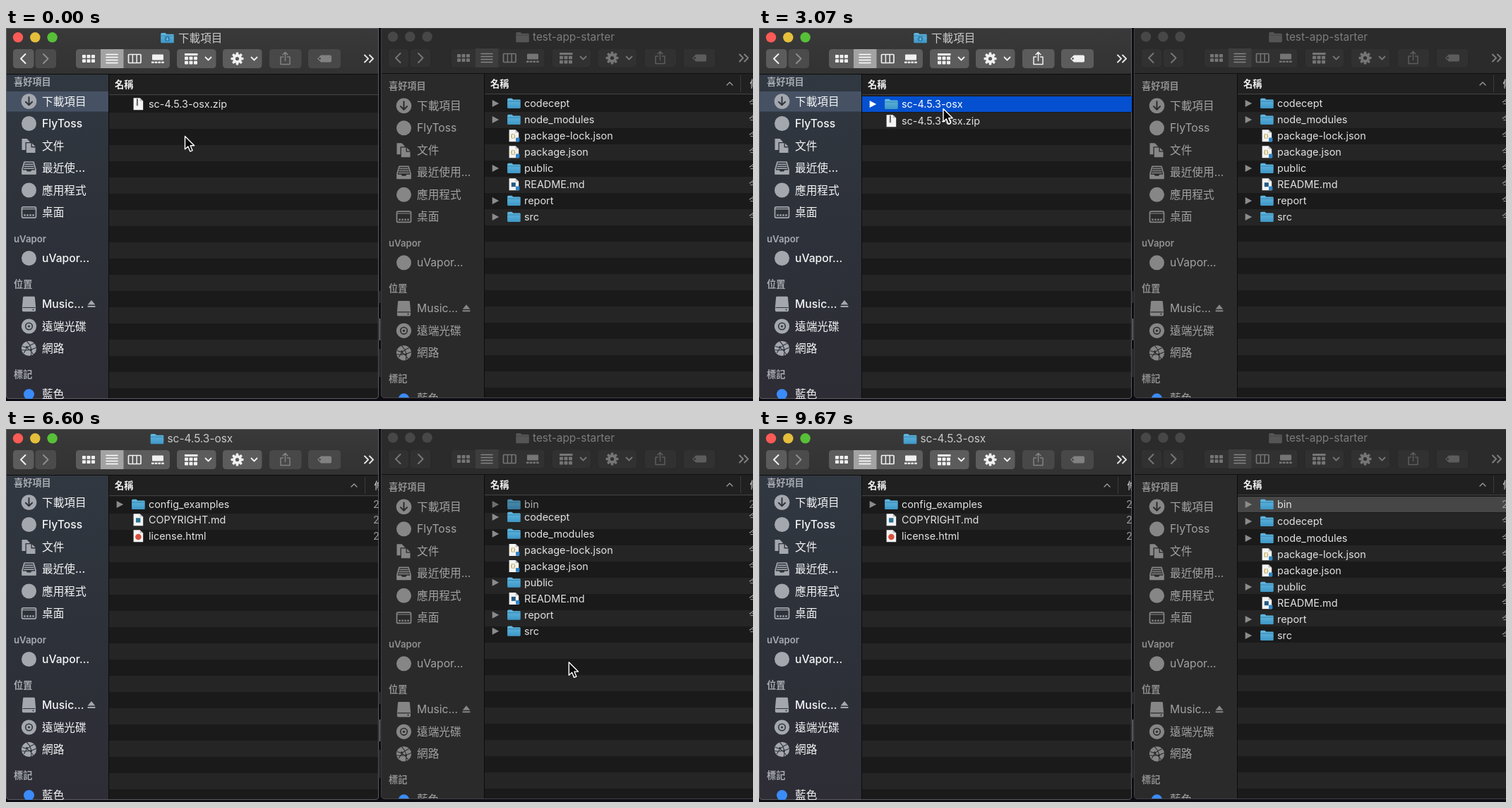
Recreate the animation shown at these times as an HTML page. Size 1058 px wide and 529 px high, loop 9740 ms.

```html
<!DOCTYPE html>
<html lang="zh-Hant">
<head>
<meta charset="utf-8">
<style>
html, body { margin: 0; width: 100%; height: 100%; overflow: hidden; background: #0c0c12; }
svg { display: block; width: 100vw; height: 100vh; }
text { font-family: Inter, "Noto Sans CJK TC", "Noto Sans CJK", sans-serif; white-space: pre; }
</style>
</head>
<body>
<svg id="stage" viewBox="0 0 1058 529" preserveAspectRatio="none">
  <defs>
    <linearGradient id="barActive" x2="0" y2="1"><stop stop-color="#393939"/><stop offset="1" stop-color="#323232"/></linearGradient>
    <linearGradient id="sideActive" x2="0" y2="1"><stop stop-color="#313841"/><stop offset=".5" stop-color="#2d3139"/><stop offset="1" stop-color="#2e2d36"/></linearGradient>
    <linearGradient id="folderBlue" x2="0" y2="1"><stop stop-color="#62b9e2"/><stop offset="1" stop-color="#3f97c6"/></linearGradient>
    <clipPath id="leftClip"><path d="M0 0H528V521Q528 526 523 526H5Q0 526 0 521Z"/></clipPath>
    <clipPath id="rightClip"><path d="M532 0H1058V525H537Q532 525 532 520Z"/></clipPath>
    <clipPath id="leftList"><rect x="146" y="96" width="382" height="429"/></clipPath>
    <clipPath id="rightList"><rect x="678" y="95" width="380" height="429"/></clipPath>
  </defs>
  <g id="base"></g>
  <g id="live"></g>
  <g id="ghost"></g>
  <path id="cursor" d="M0 0V18.4L4.3 14.5L7.3 21.6L10.6 20.2L7.6 13.3H13.2Z" fill="#080808" stroke="#fff" stroke-width="1.4" stroke-linejoin="round"/>
</svg>
<script>
const LOOP = 9740, BLUE = '#0450d0';
const $ = id => document.getElementById(id);
const clamp = v => Math.max(0, Math.min(1, v));
const ease = v => (v = clamp(v)) * v * (3 - 2 * v);
const ramp = (t, a, b) => ease((t - a) / (b - a));
const mix = (a, b, k) => a + (b - a) * k;

const rect = (x, y, w, h, fill, r = 0, extra = '') =>
  `<rect x="${x}" y="${y}" width="${w}" height="${h}" rx="${r}" fill="${fill}" ${extra}/>`;
const circle = (x, y, r, fill, extra = '') => `<circle cx="${x}" cy="${y}" r="${r}" fill="${fill}" ${extra}/>`;
const line = (d, color, w = 1.6) =>
  `<path d="${d}" fill="none" stroke="${color}" stroke-width="${w}" stroke-linecap="round" stroke-linejoin="round"/>`;
const shape = (d, fill) => `<path d="${d}" fill="${fill}"/>`;
const at = (x, y, body) => `<g transform="translate(${x} ${y})">${body}</g>`;
const text = (s, x, y, size, fill, weight = 400) =>
  `<text x="${x}" y="${y + size * .355}" font-size="${size}" font-weight="${weight}" fill="${fill}">${s}</text>`;

// Icons are centred on their own origin.
const folder = (fill = 'url(#folderBlue)', edge = '#347fa8') =>
  shape('M-9.3-5.2Q-9.3-7-7.6-7H-3L-1-5.2H8Q9.3-5.2 9.3-4V6Q9.3 7.2 8 7.2H-8Q-9.3 7.2-9.3 6Z', fill) +
  line('M-9-2.8H9', edge, .9);
const page = shape('M-6.8-8.5H2.2L6.8-4.2V8.5H-6.8Z', '#f4f4f4') + shape('M2.2-8.5V-4.2H6.8Z', '#bdbdbd');
const badge = rect(2.6, 2.6, 5.4, 5.8, '#2f86c9', 1);
const fileIcons = {
  dir: folder(),
  zip: page + line('M-1.5-7V0', '#555', 1.8) + rect(-2.7, -1.5, 2.4, 4, '#777'),
  json: page + `<text x="-4.9" y="3" font-size="8" font-weight="600" fill="#b59a2c">{}</text>` + badge,
  md: page + rect(-3.4, -2.6, 6.4, 6.4, '#2b7397'),
  mdBadge: page + rect(-3.6, -2.6, 6, 6, '#245a83') + badge,
  html: page + circle(0, 1.2, 4.3, '#d9503f')
};

const sideIcons = {
  down: (c, bg) => circle(0, 0, 10.8, c) + line('M0-6V5M-4.6 .8L0 5.4L4.6 .8', bg, 2),
  disk: c => circle(0, 0, 10.5, c),
  docs: (c, bg) => shape('M-10-10H-3L1-6V6H-10Z', c) + shape('M-5-5H4L10 1V11H-5Z', bg) +
    shape('M-3.7-3.7H3V2.5H9V10H-3.7Z', c) + shape('M4.4-3.5L9 1.1H4.4Z', c),
  tray: c => line('M-6.5-8.5H6.5L9.5 2V8.5H-9.5V2Z', c, 1.7) + line('M-5.5-5.3H5.5M-6.3-2.3H6.3M-7 .7H7', c, 1.5) +
    shape('M-9.5 3H-4L-2.5 5H2.5L4 3H9.5V9H-9.5Z', c),
  desk: c => rect(-10, -7.6, 20, 15.2, 'none', 2, `stroke="${c}" stroke-width="1.7"`) +
    line('M-9-4.8H9', c, 1.2) + [-6, -2, 2, 6].map(x => rect(x - 1.2, 2.8, 2.4, 2.4, c)).join(''),
  drive: (c, bg) => shape('M-7-10.8H7Q8.2-10.8 8.4-9.6L9.6 4V9Q9.6 10.8 7.8 10.8H-7.8Q-9.6 10.8-9.6 9V4L-8.4-9.6Q-8.2-10.8-7-10.8Z', c) +
    line('M-8.6 5H8.6', bg, 1.2) + circle(6, 8, 1, bg),
  disc: (c, bg) => circle(0, 0, 10.6, c) + circle(0, 0, 4.8, 'none', `stroke="${bg}" stroke-width="1.6"`) + circle(0, 0, 1.6, bg),
  globe: (c, bg) => circle(0, 0, 10.6, c) +
    line('M-9-3Q0-1 6 8M-7 6Q-2-4 7-7M-3-10Q5-3 3 10M-10 2Q0 4 10-1', bg, 1.1) +
    circle(-3, -2, 1.5, bg) + circle(3, 2, 1.5, bg),
  tag: () => circle(0, 0, 7.5, '#3b8cf8')
};
const sideRows = [
  ['head', '喜好項目', 76], ['down', '下載項目', 104], ['disk', 'FlyToss', 135.5], ['docs', '文件', 167],
  ['tray', '最近使', 198.5], ['disk', '應用程式', 230], ['desk', '桌面', 261.5], ['head', 'uVapor', 299.5],
  ['disk', 'uVapor...', 326.5], ['head', '位置', 363.5], ['drive', 'Music...', 391.5], ['disc', '遠端光碟', 423],
  ['globe', '網路', 454.5], ['head', '標記', 491.5], ['tag', '藍色', 519.5]
];

function sidebar(dx, dy, active) {
  const ink = active ? '#f4f5f6' : '#a2a2a2', icon = active ? '#a4a8ae' : '#868686', bg = active ? '#2e343e' : '#2b2b2b';
  return sideRows.map(([kind, label, y]) => {
    if (kind === 'head') return text(label, 11 + dx, y + dy, 13.2, active ? '#a6aab1' : '#8f8f8f', 600);
    if (kind === 'tray') label += active ? '...' : '用...';
    return at(32.5 + dx, y + dy, sideIcons[kind](icon, bg)) + text(label, 51 + dx, y + dy, 15.7, ink, active ? 500 : 400) +
      (kind === 'drive' ? at(121 + dx, y + dy - .5, shape('M0-5L5.4 1.5H-5.4ZM-5.4 3H5.4V5H-5.4Z', icon)) : '');
  }).join('');
}

const chevron = (x, y, c) => line(`M${x - 4} ${y - 2}L${x} ${y + 2}L${x + 4} ${y - 2}`, c, 1.8);
const grid = (x, y, c) => [0, 1].map(j => [0, 1, 2].map(i => rect(x - 9 + i * 6.5, y - 5.5 + j * 6.3, 5, 4.8, c, .8)).join('')).join('');
const share = c => line('M-3-2.5H-6.5V8H6.5V-2.5H3M0 3V-9M-3.4-5.8L0-9.2L3.4-5.8', c, 1.5);
const label = c => shape('M-10 0L-5-5H8Q10-5 10-3V3Q10 5 8 5H-5Z', c);
function gear(c, bg) {
  let teeth = '';
  for (let i = 0; i < 8; i++) teeth += `<rect x="-1.8" y="-9" width="3.6" height="5" rx="1" transform="rotate(${i * 45})" fill="${c}"/>`;
  return teeth + circle(0, 0, 6.5, c) + circle(0, 0, 2.6, bg);
}

function toolbar(active) {
  const box = active ? '#5c5c5d' : '#313131', ink = active ? '#f0f0f0' : '#757575', dim = active ? '#8c8c8c' : '#757575';
  const edge = active ? '' : 'stroke="#292929"', y = 43.5;
  const button = (x, w, fill = box) => rect(x, 30, w, 27, fill, 4.5, edge);
  const lights = active ? ['#fc5b57', '#e5bf3c', '#57c038'] : Array(3).fill('#474747');
  return lights.map((c, i) => circle(17 + i * 24.3, 13.3, 7.2, c)).join('') +
    button(10, 29.5) + line('M27.5 37L21 43.5L27.5 50', active ? ink : dim, 2) +
    button(41.5, 29.5, active ? '#4b4b4c' : box) + line('M53 37L59.5 43.5L53 50', dim, 2) +
    button(99, 133) + rect(134, 30, 32.5, 27, active ? '#a3a3a4' : '#3d3d3d') + grid(117, y, ink) +
    line('M142 37.5H158M142 41.5H158M142 45.5H158M142 49.5H158', active ? '#fff' : '#858585', 1.5) +
    rect(173.5, 37.5, 17.5, 12, 'none', 1, `stroke="${ink}" stroke-width="1.7"`) + line('M179.4 38V49M185.2 38V49', ink, 1.5) +
    rect(207, 37.5, 16, 8, ink, 1) + [0, 1, 2, 3].map(i => rect(206 + i * 4.7, 47.5, 3.6, 2.5, ink)).join('') +
    button(242, 55.5) + rect(253, 36, 18.5, 3, ink) + grid(262, 46, ink) + chevron(286.5, y, ink) +
    button(307, 55.5) + at(327.5, y, gear(ink, box)) + chevron(351.5, y, ink) +
    (active ? '' : actions(false, false)) +
    line('M508 38.5L513 43.5L508 48.5M515 38.5L520 43.5L515 48.5', active ? '#e6e6e6' : '#808080', 1.9);
}
function actions(enabled, active = true) {
  const box = active ? (enabled ? '#5c5c5d' : '#484849') : '#313131', edge = active ? '' : 'stroke="#292929"';
  const ink = active ? (enabled ? '#f0f0f0' : '#818181') : '#5c5c5c';
  return rect(373, 30, 45.5, 27, box, 4.5, edge) + at(395.5, 43.5, share(ink)) +
    rect(428, 30, 46, 27, box, 4.5, edge) + at(451, 43.5, label(ink)) + circle(444.5, 43.5, 1.4, box);
}

function stripes(x, y, w) {
  let s = '';
  for (let i = 0; i < 19; i++) s += rect(x, y + i * 23, w, 23, i % 2 ? '#252525' : '#1a1a1a');
  return s;
}
const columns = (x, y) => line(`M${x - 19} ${y + 2}l4-4l4 4`, '#a0a0a0', 1.2) + rect(x, y - 12, 1, 24, '#3c3c3c') +
  text('修改日期', x + 13.5, y, 13.2, '#dadada', 500);

function row(x, { name, kind, y, pick, date, alpha = 1 }) {
  const isDir = kind === 'dir', blue = pick === BLUE;
  return `<g opacity="${alpha}">` + (pick ? rect(x - 1, y - 11, 383, 22, pick) : '') +
    (isDir ? at(x + 14, y, shape('M-4.3-5L5.2 0L-4.3 5Z', blue ? '#fff' : '#8b8b8b')) : '') +
    at(x + 40.4, y - .2, fileIcons[kind]) + text(name, x + 55, y, 14.4, blue ? '#fff' : '#e2e2e2') +
    (date ? text(date, x + 373, y, 14.4, blue ? '#d7e3ff' : '#989898') : '') + '</g>';
}

function drawBase() {
  const left = rect(0, 0, 528, 526, '#1a1a1a') + rect(0, 0, 528, 66, 'url(#barActive)') + toolbar(true) +
    rect(0, 66, 146, 460, 'url(#sideActive)') + rect(145, 66, 1, 460, '#0b0c0e') +
    rect(146, 66, 382, 30, '#202020') + rect(0, 65, 528, 1, '#0b0b0b') + rect(146, 94, 382, 1, '#414141') +
    text('名稱', 154, 80, 13.2, '#f0f0f0', 600) + `<g clip-path="url(#leftList)">${stripes(146, 97, 382)}</g>`;
  const right = rect(532, 0, 526, 525, '#1a1a1a') + rect(532, 0, 526, 65, '#2b2b2b') +
    at(531, -1, toolbar(false)) + at(731.5, 13, folder('#555', '#454545')) + text('test-app-starter', 746, 13, 15.4, '#7c7c7c') +
    rect(532, 65, 146, 460, '#2a2a2a') + sidebar(531, 6.3, false) + rect(677, 65, 1, 460, '#0c0c0c') +
    rect(678, 65, 380, 30, '#202020') + rect(532, 64, 526, 1, '#101010') + rect(678, 93, 380, 1, '#414141') +
    text('名稱', 686, 79, 13.2, '#f0f0f0', 600) + columns(1040, 79) +
    `<g clip-path="url(#rightList)">${stripes(678, 96, 380)}</g>`;
  $('base').innerHTML = rect(0, 0, 1058, 529, '#0c0c12') +
    rect(529, 373, 1, 17, '#4c4c52') + rect(529, 412, 1, 31, '#9b9ba4') + rect(529, 455, 1, 40, '#4c4c52') +
    `<g clip-path="url(#leftClip)">${left}</g><g clip-path="url(#rightClip)">${right}</g>` +
    '<path d="M.5 521V.5H527.5V521Q527.5 525.5 523 525.5H5Q.5 525.5 .5 521Z" fill="none" stroke="#626268" stroke-width=".9"/>' +
    '<path d="M1058 524.5H537Q531.5 524.5 531.5 520V.5H1058" fill="none" stroke="#47474b" stroke-width=".9"/>';
}

const PICK = 1700, UNZIP = 2800, OPEN = 3620, GRAB = 4650, DROP = 6060, MARK = 6980;

function leftFiles(t) {
  if (t < OPEN) {
    const zip = { name: 'sc-4.5.3-osx.zip', kind: 'zip', y: mix(108, 132, ramp(t, UNZIP, UNZIP + 230)) };
    if (t < UNZIP) return [{ ...zip, pick: t >= PICK && BLUE }];
    return [{ name: 'sc-4.5.3-osx', kind: 'dir', y: 108, pick: BLUE }, zip];
  }
  const up = ramp(t, 6350, 6600), rest = [['config_examples', 'dir', 107], ['COPYRIGHT.md', 'md', 129], ['license.html', 'html', 152]];
  const list = rest.map(([name, kind, y], i) => ({ name, kind, y: mix(131 + i * 23, y, up), date: '2' }));
  if (up < 1) list.unshift({ name: 'bin', kind: 'dir', y: 108, date: '2', alpha: 1 - up, pick: t >= GRAB && BLUE });
  return list;
}

const project = [['codecept', 'dir'], ['node_modules', 'dir'], ['package-lock.json', 'json'], ['package.json', 'json'],
  ['public', 'dir'], ['README.md', 'mdBadge'], ['report', 'dir'], ['src', 'dir']];
function rightFiles(t, over) {
  const down = ramp(t, 6400, 6700);
  const list = project.map(([name, kind], i) => ({
    name, kind, date: '今', y: 107 + i * 23 + down * (i ? 25 : 24), pick: over && name === 'src' && BLUE
  }));
  if (down) list.unshift({ name: 'bin', kind: 'dir', y: 107, date: '2', alpha: down, pick: t >= MARK && '#464646' });
  return list;
}

// Pointer stops: time, x, y
const stops = [[0, 253.5, 153.5], [1050, 253.5, 153.5], [1600, 261, 114.5], [4080, 261, 114.5], [4600, 220.5, 110.5],
  [5010, 220.5, 110.5], [5150, 232, 119], [5820, 711.5, 271], [6100, 711.5, 271], [6750, 810.5, 340],
  [8150, 810.5, 340], [8900, 811, -28], [LOOP, 811, -28]];
function pointer(t) {
  const i = stops.findIndex(s => s[0] > t), a = stops[i - 1], b = stops[i], k = ramp(t, a[0], b[0]);
  return [mix(a[1], b[1], k), mix(a[2], b[2], k)];
}

const cache = {};
function put(id, html) {
  if (cache[id] !== html) $(id).innerHTML = cache[id] = html;
}

function draw(t) {
  const [x, y] = pointer(t), opened = t >= OPEN, dragging = t > 5150 && t < DROP;
  const chosen = (t >= PICK && t < OPEN) || (t >= GRAB && t < DROP + 300);
  const title = opened
    ? at(214, 14, folder()) + text('sc-4.5.3-osx', 228.5, 14, 15.4, '#c9c9c9')
    : at(228.5, 14, folder() + circle(0, 1.5, 3.8, '#2f7fae') + line('M0-.5V3M-1.5 1.7L0 3.2L1.5 1.7', '#79c7ec', 1)) +
      text('下載項目', 244, 14, 15.6, '#c9c9c9');
  put('live',
    `<g clip-path="url(#leftClip)">${title}${actions(chosen)}${opened ? columns(508, 80) : rect(1, 90, 144, 28.5, '#465264')}` +
    `${sidebar(0, 0, true)}</g><g clip-path="url(#leftList)">` +
    leftFiles(t).map(f => row(147, f)).join('') + '</g><g clip-path="url(#rightList)">' +
    rightFiles(t, dragging && x > 679).map(f => row(679, f)).join('') + '</g>');
  put('ghost', dragging
    ? at(x - 711.5, y - 271, at(666, 260, folder()) + rect(677.5, 251, 33, 19.5, BLUE, 7) + text('bin', 681, 260.5, 14.4, '#fff'))
    : '');
  $('cursor').setAttribute('transform', `translate(${x} ${y})`);
}

drawBase();
const start = performance.now();
function tick() {
  draw((performance.now() - start) % LOOP);
  requestAnimationFrame(tick);
}
tick();
</script>
</body>
</html>
```
